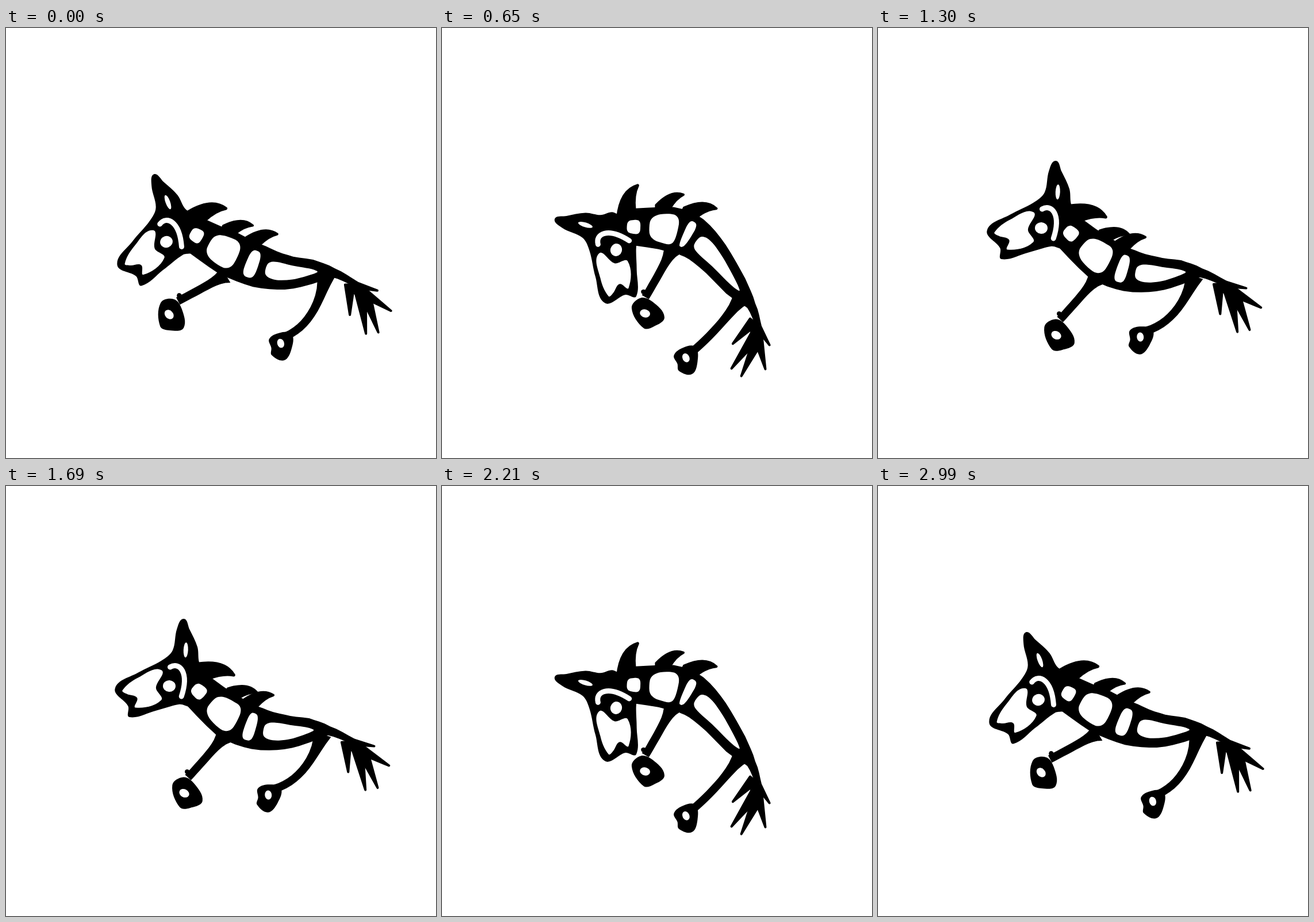
Write an HTML page that moves like this. It is 748 px wide and 748 px high and loops after 3120 ms.

```html
<!DOCTYPE html>
<html lang="en">
<head>
<meta charset="utf-8">
<title>Galloping horse</title>
<style>
  html, body { margin: 0; width: 100%; height: 100%; overflow: hidden; background: #fff; }
  #strip { display: block; width: 4488px; height: 748px; animation: gallop 1560ms step-end infinite; }
  .hole { fill: #fff; }
  .brow { fill: none; stroke: #fff; stroke-width: 9; stroke-linecap: round; }
  .spike { stroke: #000; stroke-width: 4; stroke-linejoin: round; }
  /* six poses side by side, played forth and back */
  @keyframes gallop {
    0%, 91.666% { transform: translateX(0); }
    8.333%, 83.333% { transform: translateX(-748px); }
    16.666%, 75% { transform: translateX(-1496px); }
    25%, 66.666% { transform: translateX(-2244px); }
    33.333%, 58.333% { transform: translateX(-2992px); }
    41.666% { transform: translateX(-3740px); }
    100% { transform: translateX(0); }
  }
</style>
</head>
<body>
<svg id="strip" viewBox="0 0 4488 748"></svg>
<script>
const SIZE = 748;
const DEG = 180 / Math.PI;

// Spine runs neck to tail; head, fore, hind and hoof are turns in degrees from rest.
const reach = { spine: [314,351, 387,392, 441,415, 488,425, 534,424, 570,426, 610,446], eye: [279,372], head: -20, fore: 17, hind: -8, hoof: -9, bend: 1 };
const rise = { spine: [319,343, 388,401, 437,422, 485,428, 528,425, 562,426, 604,444], eye: [284,348], head: 2.5, fore: -3, hind: 0, hoof: -5, bend: 1 };
const rest = { spine: [313,356, 383,416, 440,434, 489,433, 535,426, 572,426, 615,441], eye: [277,362], head: 0, fore: 0, hind: 0, hoof: 0, bend: 1 };
const curl = { spine: [313,345, 397,350, 435,364, 471,397, 511,449, 538,483, 551,519], eye: [303,386], head: -73, fore: -15, hind: 1, hoof: -27, bend: 0.2 };

const girth = [30, 39, 37, 30, 21, 8, 5]; // half the trunk's thickness at each spine point
const cells = [[0.1, 0.36, 20], [0.53, 1.25, 12], [1.55, 1.95, 13], [2.22, 4.2, 16]]; // from, to, wall
const tufts = [[0.22, 1.3], [0.93, 1], [1.75, 1.1]]; // place on the back, scale
const tailHairs = [ // base, tip, width
  [603,443, 610,495, 20], [622,448, 642,524, 24], [634,460, 663,519, 20],
  [618,449, 680,479, 22], [610,442, 652,447, 14]
];

const mix = (a, b, k) => a + (b - a) * k;
const range = (n, fn) => Array.from({ length: n }, (_, i) => fn(i));
const pairs = text => text.match(/\d+ \d+/g).map(p => p.split(" ").map(Number));
const show = pts => pts.map(p => p.map(v => v.toFixed(1)).join(" ")).join(" ");

function between(a, b, k) {
  const blend = (v, w) => Array.isArray(v) ? v.map((x, i) => mix(x, w[i], k)) : mix(v, w, k);
  return Object.fromEntries(Object.keys(a).map(key => [key, blend(a[key], b[key])]));
}

// Smooth closed curve; handles stay a third of their own segment.
function curve(pts) {
  const n = pts.length, point = i => pts[(i + n) % n];
  const tangent = i => {
    const [ax, ay] = point(i - 1), [bx, by] = point(i + 1);
    const d = Math.hypot(bx - ax, by - ay) || 1;
    return [(bx - ax) / d, (by - ay) / d];
  };
  const parts = pts.map((a, i) => {
    const b = point(i + 1), u = tangent(i), v = tangent(i + 1);
    const h = Math.hypot(b[0] - a[0], b[1] - a[1]) / 3;
    return "C" + show([[a[0] + u[0] * h, a[1] + u[1] * h], [b[0] - v[0] * h, b[1] - v[1] * h], b]);
  });
  return "M" + show([pts[0]]) + parts.join("") + "Z";
}

const shape = (pts, cls = "") => `<path class="${cls}" d="${curve(pts)}"/>`;
const polygon = (pts, cls = "") => `<polygon class="${cls}" points="${show(pts)}"/>`;
const hole = (x, y, rx, ry, tilt = 0) =>
  `<ellipse class="hole" cx="${x}" cy="${y}" rx="${rx}" ry="${ry}" transform="rotate(${tilt} ${x} ${y})"/>`;

// Moves a part from its joint at rest to the joint now, turned.
const place = (now, then, turn, body) =>
  `<g transform="translate(${now.x} ${now.y}) rotate(${turn}) translate(${-then.x} ${-then.y})">${body}</g>`;

// Point of the trunk: u along the spine, side 1 is the back and -1 the belly.
function trunkAt({ spine }, u, side = 0, wall = 0) {
  const i = Math.min(Math.floor(u), 5), t = u - i;
  const axis = c => {
    const p = j => spine[j * 2 + c];
    const b = p(i), d = p(i + 1);
    const a = i ? p(i - 1) : 2 * b - d, e = i < 5 ? p(i + 2) : 2 * d - b;
    const k1 = (d - a) / 2, k2 = 2 * a - 5 * b + 4 * d - e, k3 = 3 * (b - d) + e - a;
    return [b + k1 * t + (k2 * t * t + k3 * t ** 3) / 2, k1 + k2 * t + 1.5 * k3 * t * t];
  };
  const [x, dx] = axis(0), [y, dy] = axis(1);
  const out = side * Math.max(0, mix(girth[i], girth[i + 1], t) - wall) / Math.hypot(dx, dy);
  return { x: x + dy * out, y: y - dx * out, angle: Math.atan2(dy, dx) * DEG };
}

const xy = p => [p.x, p.y];

function trunk(pose) {
  const edge = side => range(25, i => xy(trunkAt(pose, i / 4, side)));
  return polygon([...edge(1), ...edge(-1).reverse()]);
}

// Rounded window between two ribs.
function cell(pose, [from, to, wall]) {
  const soft = v => Math.sign(v) * Math.abs(v) ** 0.65;
  return shape(range(24, i => {
    const a = i * Math.PI / 12;
    return xy(trunkAt(pose, mix(from, to, (1 + soft(Math.cos(a))) / 2), soft(Math.sin(a)), wall));
  }), "hole");
}

// Bent limb, flared where it leaves the trunk.
function limb(from, via, to) {
  const side = s => range(13, i => {
    const t = i / 12;
    const at = c => mix(mix(from[c], via[c], t), mix(via[c], to[c], t), t);
    const dx = mix(via[0] - from[0], to[0] - via[0], t), dy = mix(via[1] - from[1], to[1] - via[1], t);
    const half = s * (7 + 9 * (1 - t) ** 7) / Math.hypot(dx, dy);
    return [at(0) - dy * half, at(1) + dx * half];
  });
  return polygon([...side(1), ...side(-1).reverse()]);
}

function hair([bx, by, tx, ty, width]) {
  const k = (width - 4) / 2 / Math.hypot(tx - bx, ty - by);
  const dx = (ty - by) * k, dy = (bx - tx) * k;
  return polygon([[bx + dx, by + dy], [tx, ty], [bx - dx, by - dy]], "spike");
}

function mane(pose) {
  return tufts.map(([u, scale], i) => {
    const root = trunkAt(pose, u, 1);
    const angle = i ? root.angle : trunkAt(rest, u, 1).angle + pose.head; // the first follows the head
    return place(root, { x: 0, y: 0 }, angle,
      `<path class="spike" transform="scale(${scale})" d="M-25 0Q-3 -30 20 -24Q8 -16 0 2L-2 10L-24 10Z"/>`);
  }).join("");
}

function head({ eye: [x, y], head: turn }) {
  const skull = pairs("183 370 222 341 262 318 280 300 286 262 297 244 308 262 323 292 327 318 338 340 318 394 296 393 255 406 210 419 207 400");
  const face = pairs("196 373 222 350 262 335 254 366 264 387 220 402 222 385 204 379");
  return place({ x, y }, { x: rest.eye[0], y: rest.eye[1] }, turn,
    shape(skull) + shape(face, "hole") + hole(277, 362, 11, 10) + hole(303, 298, 4, 13) +
    `<path class="brow" d="M277 329C293 319 311 336 299 379"/>`);
}

function foreLeg(pose) {
  const joint = p => trunkAt(p, 1.12, -1);
  const hoof = pairs("283 532 303 519 321 531 334 562 312 573 294 571");
  return place(joint(pose), joint(rest), pose.fore,
    limb([377, 452], [345, 487], [311, 520]) + `<circle cx="310" cy="510" r="4"/>` +
    shape(hoof) + hole(303, 547, 9, 7, 30));
}

function hindLeg(pose) {
  const joint = p => trunkAt(p, 4.5, -1);
  const hoof = pairs("447 541 448 525 468 520 488 528 480 553 462 568 444 553");
  const knee = [517 + 14 * pose.bend, 483 + 28 * pose.bend];
  const ankle = { x: 465, y: 538 };
  return place(joint(pose), joint(rest), pose.hind,
    limb([559, 432], knee, [476, 527]) +
    place(ankle, ankle, pose.hoof, shape(hoof) + hole(465, 538, 6, 8)));
}

function tail(pose) {
  const now = trunkAt(pose, 6), then = trunkAt(rest, 6);
  return place(now, then, now.angle - then.angle, tailHairs.map(hair).join(""));
}

const horse = pose => [trunk, foreLeg, hindLeg, tail, mane, head].map(part => part(pose)).join("") +
  cells.map(c => cell(pose, c)).join("");

const poses = [reach, rise, between(rise, rest, 0.5), rest, between(rest, curl, 0.5), curl];
document.getElementById("strip").innerHTML =
  poses.map((pose, i) => `<g transform="translate(${i * SIZE} 0)">${horse(pose)}</g>`).join("");
</script>
</body>
</html>
```
